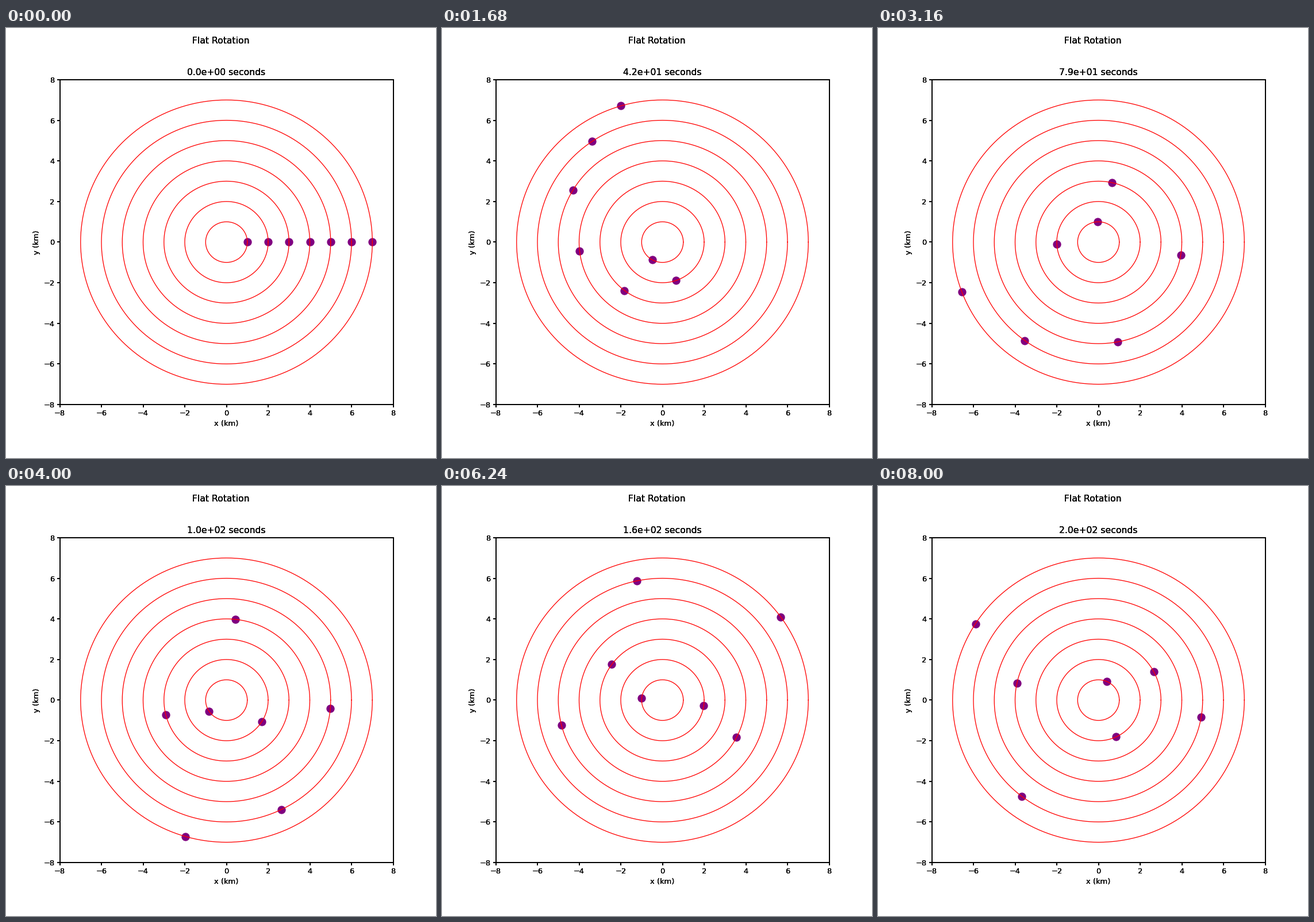
Recreate the animation shown at these times as a matplotlib script. Size 748x748 px, loop 8.04 s.

```python
import numpy as np
import matplotlib.pyplot as plt
from matplotlib.animation import FuncAnimation

SIZE, DPI = 748, 93.5
FRAMES, INTERVAL = 201, 40

plt.rcParams.update({
    "font.family": "DejaVu Sans",
    "axes.linewidth": 1.2,
    "xtick.major.width": 1.2,
    "ytick.major.width": 1.2,
})

# Orbit radii (km) and rotation curve (km/s): rising, then flat
radii = np.arange(1, 8)
speeds = np.array([0.10, 0.24, 0.29, 0.31, 0.31, 0.31, 0.31])
omega = speeds / radii

fig = plt.figure(figsize=(SIZE / DPI, SIZE / DPI), dpi=DPI, facecolor="white")
BOX = [93.5 / SIZE, 93 / SIZE, 580 / SIZE, 565.1 / SIZE]


def add_layer(index):
    ax = fig.add_axes(BOX, label=f"layer{index}", facecolor="none")
    ticks = range(-8, 9, 2)
    ax.set(xlim=(-8, 8), ylim=(-8, 8), xticks=ticks, yticks=ticks,
           xlabel="x (km)", ylabel="y (km)")
    fig.text(0.5, 0.98, "Flat Rotation", ha="center", va="top", fontsize=12)
    return ax


# Stacked identical axes give the dense black lettering and frame
layers = [add_layer(i) for i in range(3)]
titles = [ax.set_title("", fontsize=12, y=1.0) for ax in layers]

base = layers[0]
theta = np.linspace(0, 2 * np.pi, 361)
for r in radii:
    base.plot(r * np.cos(theta), r * np.sin(theta), color="red", lw=1)
dots = base.scatter(radii, 0 * radii, s=100, color="purple")


def update(t):
    angle = omega * t
    dots.set_offsets(np.column_stack([radii * np.cos(angle),
                                      radii * np.sin(angle)]))
    for title in titles:
        title.set_text(f"{t:.1e} seconds")
    return [dots, *titles]


anim = FuncAnimation(fig, update, frames=FRAMES, interval=INTERVAL,
                     repeat=True, repeat_delay=0, blit=False)
plt.show()
```
